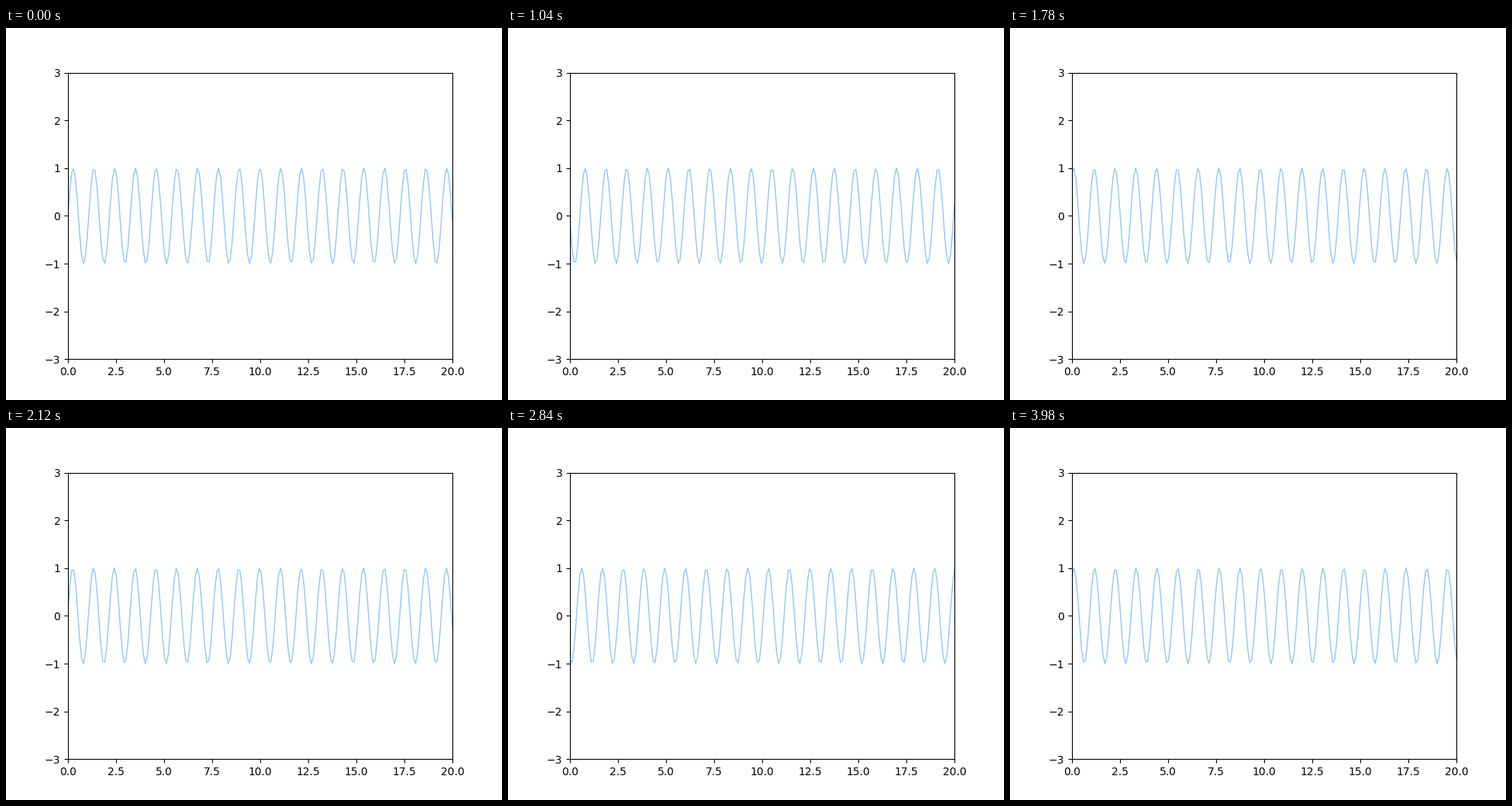
Recreate the animation shown at these times as a matplotlib script. Size 640 by 480 pixels, loop 4000 ms.

```python
import numpy as np
import matplotlib.pyplot as plt
from matplotlib.animation import FuncAnimation

FRAMES = 200
INTERVAL = 20       # ms
WAVELENGTH = 1.08
STEP = 0.01         # distance travelled per frame

fig, ax = plt.subplots(figsize=(6.4, 4.8), dpi=100)
ax.set_xlim(0, 20)
ax.set_ylim(-3, 3)

x = np.linspace(0, 20, 200)
line, = ax.plot([], [], color="dodgerblue", alpha=0.5, lw=1)


def update(i):
    line.set_data(x, np.sin(2 * np.pi / WAVELENGTH * (x - STEP * i)))
    return line,


anim = FuncAnimation(fig, update, frames=FRAMES, interval=INTERVAL,
                     repeat=True, repeat_delay=0)
plt.show()
```
